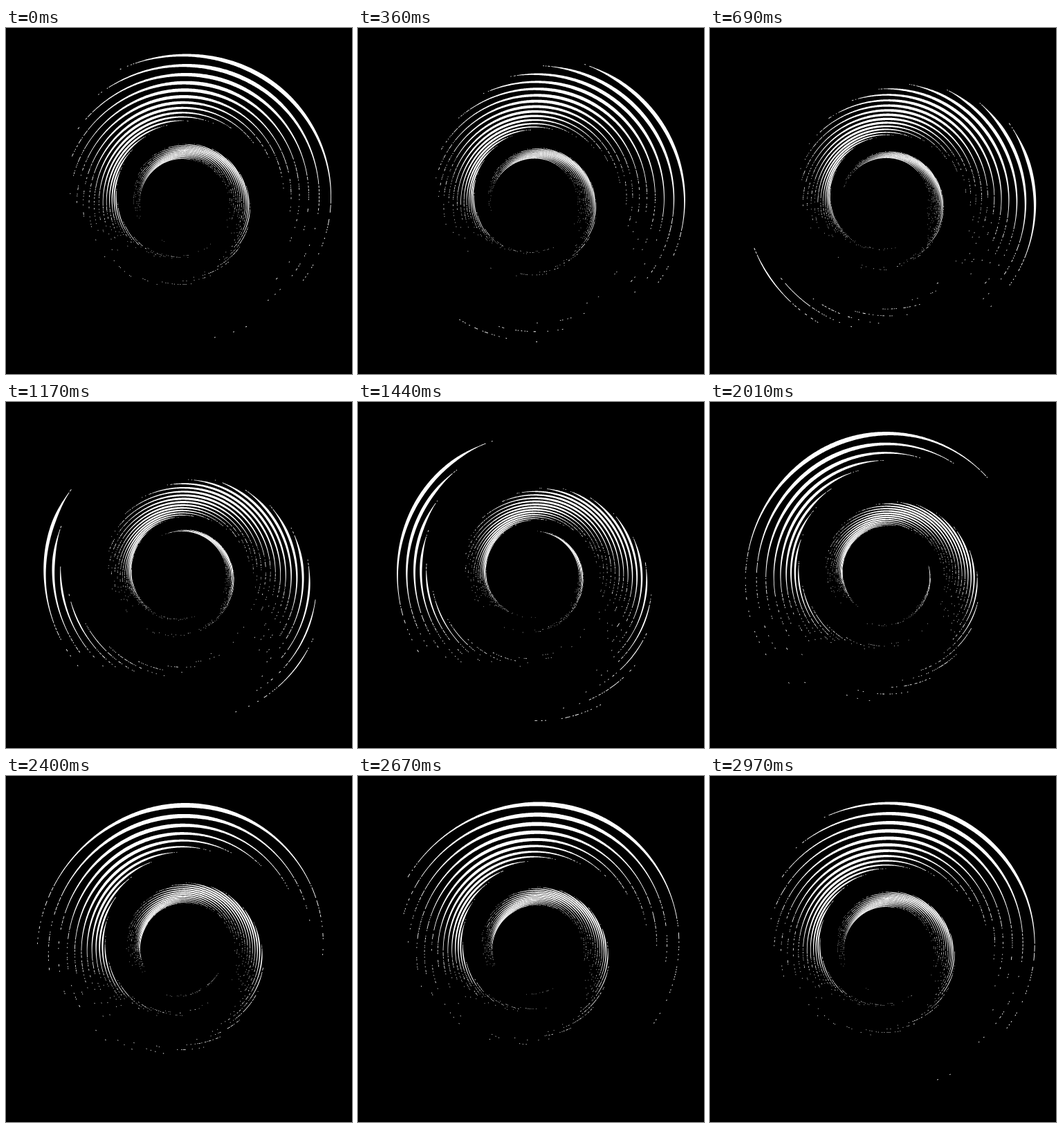
Write an HTML page with a canvas that moves like this. It is 500 by 500 pixels and loops after 3 s.

```html
<!DOCTYPE html>
<html lang="en">
<head>
<meta charset="utf-8">
<title>Spiral tunnel</title>
<style>
html, body { margin: 0; width: 100%; height: 100%; overflow: hidden; background: #000; }
canvas { display: block; width: 500px; height: 500px; }
</style>
</head>
<body>
<canvas id="stage" width="500" height="500"></canvas>
<script>
const ctx = document.getElementById('stage').getContext('2d');
const LOOP = 3000, STEP = 30;
const RINGS = 32, TWIST = 16.25, HALF = 99, RAMP = 20;
const PARTS = 2; // segments per degree
const rad = d => d * Math.PI / 180;
const wrap = d => ((d + 180) % 360 + 360) % 360 - 180;

function smooth(x) {
  const v = Math.min(1, Math.max(0, x));
  return v * v * (3 - 2 * v);
}

function hash(a, b) {
  const v = Math.sin(a * 127.1 + b * 311.7) * 43758.5453;
  return v - Math.floor(v);
}

// Lit width of a ring at screen angle deg, when it leans towards lean
function thickness(deg, lean, scale) {
  const off = Math.abs(wrap(deg - lean));
  if (off >= HALF) return 0;
  const focus = 4 + 4 * Math.max(0, Math.sin(rad(lean)));
  const glint = Math.abs(Math.cos(rad(deg - (lean - 90) / 2))) ** focus;
  const light = (1 - Math.sin(rad(deg))) / 2;
  const lit = 5.5 * glint * (0.4 + 0.6 * light) + 1.2 * light * light;
  return lit * smooth((HALF - off) / RAMP) * scale;
}

function fillRun(outer, inner) {
  if (outer.length < 2) return;
  ctx.beginPath();
  outer.forEach(p => ctx.lineTo(p[0], p[1]));
  inner.reverse().forEach(p => ctx.lineTo(p[0], p[1]));
  ctx.closePath();
  ctx.fill();
}

function ring(n, spin) {
  const R = 2770 / (13.41 + n), size = R / 206.5;
  const scale = size ** 1.2;
  const cx = 253 + 2.5 * size, cy = 250;
  const lean = spin - TWIST * n;
  const thin = 0.55 + 0.35 * size;
  const first = Math.floor((lean - HALF) * PARTS);
  const last = Math.ceil((lean + HALF) * PARTS);
  let outer = [], inner = [];

  function add(deg, t) {
    const a = rad(deg), b = rad(deg - lean);
    const c = Math.cos(a), s = Math.sin(a);
    const r = R * (1 + (0.039 * c + 0.005) * Math.cos(b) - 0.019 * Math.sin(b));
    const h = Math.max(t, thin) / 2;
    outer.push([cx + (r + h) * c, cy + (r + h) * s]);
    inner.push([cx + (r - h) * c, cy + (r - h) * s]);
  }

  for (let k = first; k <= last; k++) {
    const deg = k / PARTS, next = (k + 1) / PARTS;
    const t = thickness(deg, lean, scale);
    // weak light breaks the line into specks
    const shown = t > 0.02 && (t >= thin || hash(n, wrap(deg)) < t / thin);
    if (shown) {
      if (!outer.length) add(deg, t);
      add(next, thickness(next, lean, scale));
    } else if (outer.length) {
      fillRun(outer, inner);
      outer = [];
      inner = [];
    }
  }
  fillRun(outer, inner);
}

function draw(ms) {
  ctx.fillStyle = '#000';
  ctx.fillRect(0, 0, 500, 500);
  ctx.fillStyle = '#fff';
  const spin = -18 + 360 * ms / LOOP;
  for (let n = 0; n < RINGS; n++) ring(n, spin);
}

const start = performance.now();
function tick() {
  const t = (performance.now() - start) % LOOP;
  draw(Math.floor(t / STEP) * STEP);
  requestAnimationFrame(tick);
}
tick();
</script>
</body>
</html>
```
